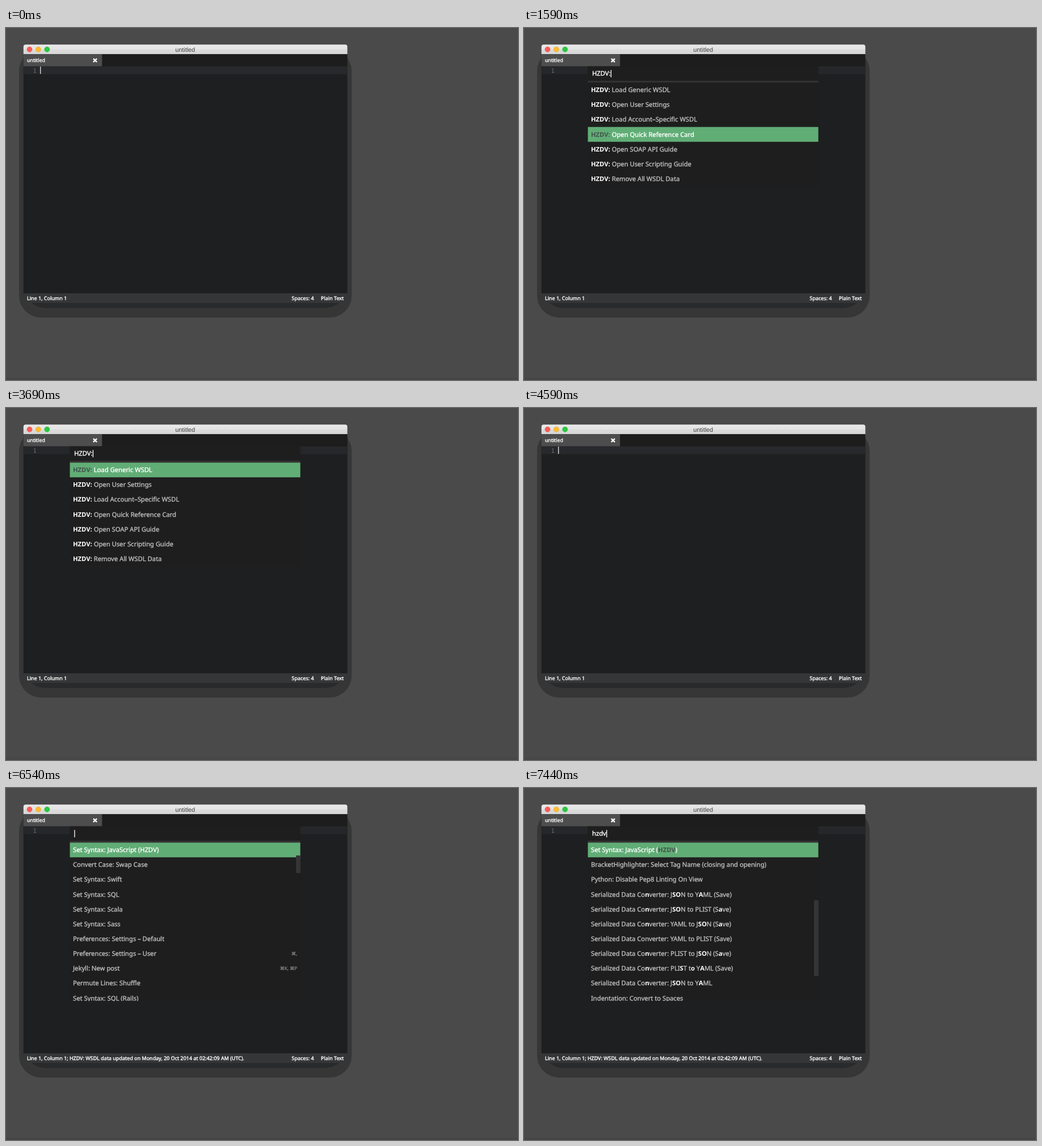
Animation, 902 px wide and 621 px high, one loop 8000 ms. Source, as an HTML page with a canvas:

```html
<!DOCTYPE html>
<html lang="en">
<head>
<meta charset="utf-8">
<title>Command palette</title>
<style>
  html, body { margin: 0; width: 100%; height: 100%; overflow: hidden; background: #4a4a4a; }
  canvas { display: block; }
</style>
</head>
<body>
<canvas id="stage" width="902" height="621"></canvas>
<script>
const ctx = document.getElementById('stage').getContext('2d');
const LOOP = 8000;
const SANS = '"Noto Sans", "DejaVu Sans", sans-serif';
const ROW = 26.15;
const WIN = { x: 30.77, w: 570.6 };
const LIST = { x: 112.3, y: 96.15, w: 406.4, bottom: 376 };
const NAME = 'HZDV';
const MESSAGE = `; ${NAME}: WSDL data updated on Monday, 20 Oct 2014 at 02:42:09 AM (UTC).`;

// Asterisks enclose matched letters; a bar separates the shortcut.
const twoLetters = [
  'Set Syntax: JavaScript (*HZ*DV)',
  'Co*n*vert Case: *S*wap Case',
  'Set Sy*n*tax: *S*wift',
  'Set Sy*n*tax: *S*QL',
  'Set Sy*n*tax: *S*cala',
  'Set Sy*n*tax: *S*ass',
  'Prefere*n*ces: *S*ettings – Default',
  'Prefere*n*ces: *S*ettings – User|⌘,',
  'Jekyll: *N*ew po*s*t|⌘K, ⌘P',
  'Permute Li*n*es: *S*huffle',
  'Set Sy*n*tax: *S*QL (Rails)'
];
const unfiltered = twoLetters.map(s => s.replaceAll('*', ''));

const converter = 'Serialized Data Co*n*verter: ';
const fourLetters = [
  'Set Syntax: JavaScript (*HZDV*)',
  'BracketHighlighter: Select Tag Name (closing and opening)',
  'Python: Disable Pep8 Linting On View',
  converter + 'J*SO*N to Y*A*ML (Save)',
  converter + 'J*SO*N to PLIST (S*a*ve)',
  converter + 'YAML to J*SO*N (S*a*ve)',
  'Serialized Data Converter: YAML to PLIST (Save)',
  converter + 'PLIST to J*SO*N (S*a*ve)',
  converter + 'PLI*S*T t*o* Y*A*ML (Save)',
  converter + 'J*SO*N to Y*A*ML',
  'Indentation: Convert to Spaces'
];
const threeLetters = fourLetters.map(s =>
  s.replace('*HZDV*', '*HZD*V').replace(/\*([Aa])\*/g, '$1'));

const step = (verb, amount, keys) => `Emmet: ${verb} *N*umber by ${amount}|${keys}`;
const oneLetter = [
  'Set Syntax: XML (*H*ZDV)',
  'Emmet: Select *N*ext Item|⇧⌘.',
  'BracketHighlighter: Select *N*ext Attribute (left)',
  'BracketHighlighter: Select *N*ext Attribute (right)',
  step('Decrement', 1, '⌃Down'),
  step('Decrement', 10, '⌥⌘Down'),
  step('Increment', 1, '⌃Up'),
  step('Increment', 10, '⌥⌘Up'),
  step('Decrement', 0.1, '⌥Down'),
  step('Increment', 0.1, '⌥Up'),
  'Set Syntax: JavaScript (*H*ZDV)'
];
const commands = [
  'Load Generic WSDL', 'Open User Settings', 'Load Account–Specific WSDL',
  'Open Quick Reference Card', 'Open SOAP API Guide',
  'Open User Scripting Guide', 'Remove All WSDL Data'
].map(s => `*${NAME}: *${s}`);

const palette = (query, rows, bar, selected = 0, top = LIST.y) =>
  ({ query, rows, bar, selected, top });
const shortBar = [119, 31];
const longBar = [198, 134];
const picked = i => palette(NAME + ':', commands, null, i);

const timeline = [
  [0, null],
  [300, palette('', unfiltered, shortBar)],
  [1140, palette('HZ', twoLetters, shortBar)],
  [1290, palette('HZD', threeLetters, longBar)],
  [1440, palette('HZDV', fourLetters, longBar)],
  [1590, picked(3)],
  [3090, picked(2)],
  [3390, picked(1)],
  [3690, picked(0)],
  [4590, null],
  [6540, palette('', unfiltered, shortBar)],
  [7140, palette('h', oneLetter, [113, 31], 10, LIST.bottom - 11 * ROW - 0.3)],
  [7290, palette('hz', twoLetters, shortBar)],
  [7440, palette('hzdv', fourLetters, longBar)]
];

function rect(color, x, y, w, h) {
  ctx.fillStyle = color;
  ctx.fillRect(x, y, w, h);
}

function rounded(color, x, y, w, h, r) {
  ctx.fillStyle = color;
  ctx.beginPath();
  ctx.roundRect(x, y, w, h, r);
  ctx.fill();
}

// Draws text, thickened by an outline, and returns the x position after it.
function text(str, x, y, size, color, { weight = 400, align = 'left', family = SANS, outline = 0.38 } = {}) {
  ctx.font = `${weight} ${size}px ${family}`;
  ctx.textAlign = align;
  ctx.fillStyle = ctx.strokeStyle = color;
  ctx.fillText(str, x, y);
  if (outline && weight === 400) {
    ctx.lineWidth = outline;
    ctx.strokeText(str, x, y);
  }
  return x + ctx.measureText(str).width;
}

function drawWindow(open, message) {
  rect('#4a4a4a', 0, 0, 902, 621);
  rect('#464646', 0, 617, 902, 4);
  rounded('#363636', 23, 37, 586, 474, 39);
  rounded('#292a2b', 31, 60, 570, 434, 38);

  const bar = ctx.createLinearGradient(0, 29, 0, 46);
  bar.addColorStop(0, '#e9e9e9');
  bar.addColorStop(0.5, '#e4e4e4');
  bar.addColorStop(0.53, '#dadbda');
  bar.addColorStop(1, '#d5d6d5');
  rounded(bar, WIN.x, 29.2, WIN.w, 17, [4, 4, 0, 0]);
  [['#fc5b57', '#df4744'], ['#fdbc2f', '#de9f34'], ['#2ac940', '#22aa35']].forEach(([fill, rim], i) => {
    ctx.beginPath();
    ctx.arc(41.5 + i * 15.4, 37.7, 4.5, 0, 7);
    ctx.fillStyle = fill;
    ctx.fill();
    ctx.strokeStyle = rim;
    ctx.lineWidth = 0.6;
    ctx.stroke();
  });
  text('untitled', 315.7, 41.6, 10.8, '#414141',
    { align: 'center', family: '"Liberation Sans", Arial, sans-serif', outline: 0 });

  rect('#1c1d1c', WIN.x, 46.15, WIN.w, 22);
  rect('#4c4d4c', WIN.x, 46.15, 138.4, 22);
  text('untitled', 37, 60, 8.7, '#fff');
  ctx.strokeStyle = '#fff';
  ctx.lineWidth = 2.4;
  ctx.beginPath();
  ctx.moveTo(153.8, 54);
  ctx.lineTo(160, 60.2);
  ctx.moveTo(160, 54);
  ctx.lineTo(153.8, 60.2);
  ctx.stroke();

  rect('#1e1f20', WIN.x, 67.7, WIN.w, 401);
  rect(open ? '#25272a' : '#28292c', WIN.x, 67.7, WIN.w, 13.8);
  text('1', 47.6, 79, 10.5, '#686e73', { family: '"DejaVu Sans Mono", monospace', outline: 0 });
  if (!open) rect('#d8d8d8', 60, 68, 1.4, 13);

  rect('#353637', WIN.x, 468, WIN.w, 17);
  text('Line 1, Column 1' + (message ? MESSAGE : ''), 37, 479.6, 8.98, '#fff');
  text('Spaces: 4', 542.3, 479.6, 8.98, '#fff', { align: 'right' });
  text('Plain Text', 595, 479.6, 8.98, '#fff', { align: 'right' });
}

function drawRow(row, y, active) {
  const [label, keys] = row.split('|');
  if (active) rect('#61ad76', LIST.x, y, LIST.w, ROW);
  let x = 118;
  label.split('*').forEach((part, i) => {
    const match = i % 2;
    const color = active ? (match ? '#42524a' : '#fff') : (match ? '#fff' : '#bdbdbd');
    x = text(part, x, y + 16.95, 11.22, color, { weight: match ? 700 : 400 });
  });
  if (keys) text(keys, 513, y + 15.6, 8.1, '#8c8c8c', { align: 'right', outline: 0.25 });
}

function drawPalette({ query, rows, bar, selected, top }) {
  const bottom = Math.min(LIST.bottom, top + rows.length * ROW);
  rect('#1e1e1e', LIST.x, 67.7, LIST.w, bottom - 67.7);
  const end = text(query, 120, 84.4, 11.22, '#fff');
  rect('#fff', end + 0.2, 74, 1.3, 13);
  rect('#333', LIST.x, 93.1, LIST.w, 3.05);

  ctx.save();
  ctx.beginPath();
  ctx.rect(LIST.x, LIST.y, LIST.w, bottom - LIST.y);
  ctx.clip();
  rows.forEach((row, i) => drawRow(row, top + i * ROW, i === selected));
  if (bar) rect('#353535', 511, bar[0], 8, bar[1]);
  ctx.restore();
}

ctx.textRendering = 'geometricPrecision';
ctx.lineJoin = 'round';
const start = performance.now();

function draw() {
  const t = (performance.now() - start) % LOOP;
  const [, panel] = timeline.findLast(([at]) => at <= t);
  drawWindow(panel !== null, t >= 5490);
  if (panel) drawPalette(panel);
  requestAnimationFrame(draw);
}
draw();
</script>
</body>
</html>
```
